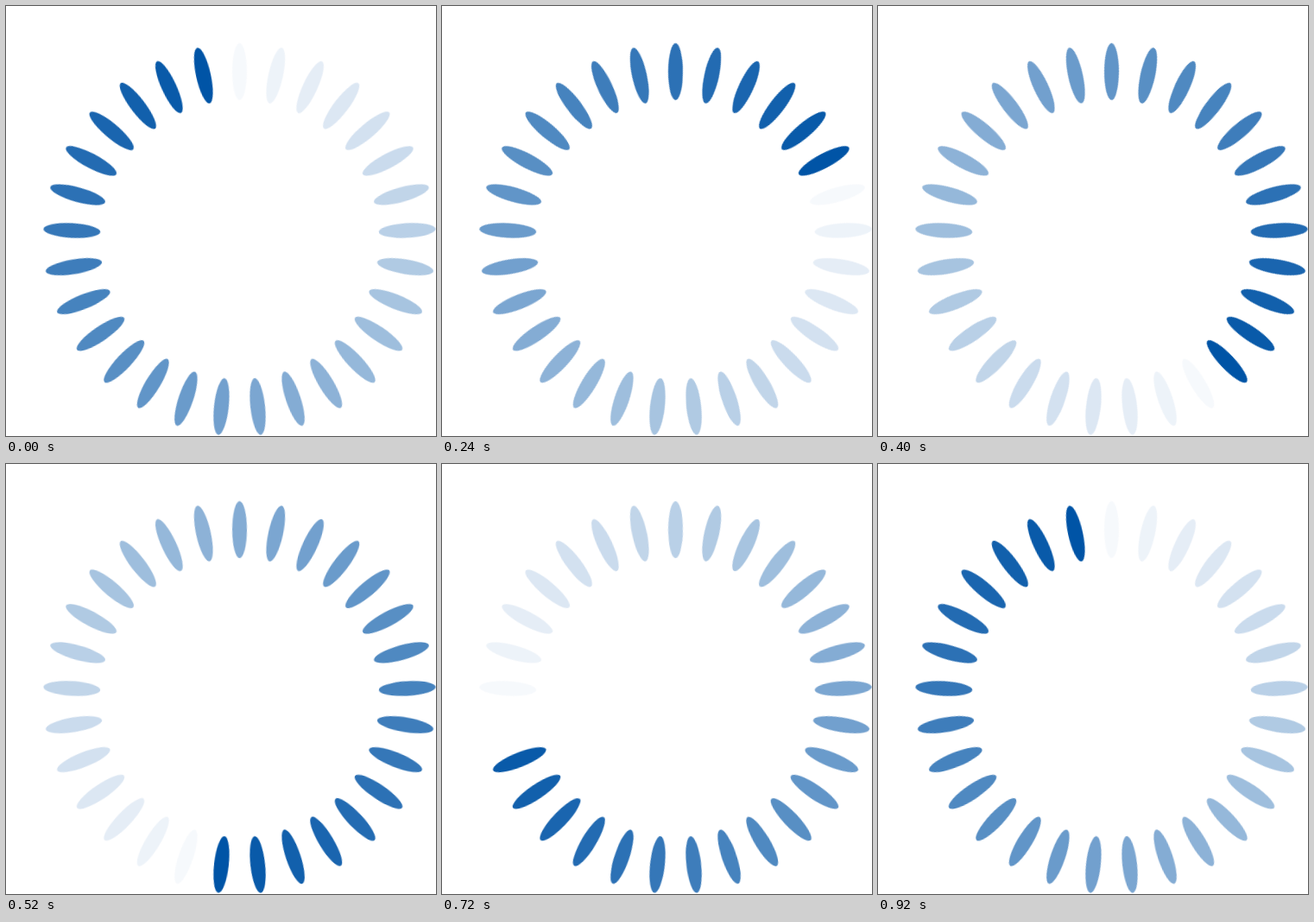
Animation, 498 px wide and 498 px high, one loop 960 ms. Source, as an HTML page without scripts:

```html
<!DOCTYPE html>
<html lang="en">
<head>
<meta charset="utf-8">
<title>Loading spinner</title>
<style>
  html, body { margin: 0; width: 100%; height: 100%; overflow: hidden; background: #fff; }
  svg { display: block; width: 498px; height: 498px; --step: calc(360deg / 29); }
  g, ellipse { transform-origin: 270.5px 270.5px; }
  ellipse {
    fill: #0054a6;
    transform: rotate(calc(var(--i) * -1 * var(--step)));
    opacity: calc(1 - var(--i) / 29);
  }

  /* One petal per tick, plus an extra petal on every third tick later on */
  .turn { animation: turn 960ms steps(24) infinite; }
  .skip { animation: skip 960ms step-end infinite; }
  .head { animation: blink 960ms step-end infinite; }

  @keyframes turn {
    from { transform: rotate(calc(-1 * var(--step))); }
    to   { transform: rotate(calc(23 * var(--step))); }
  }
  @keyframes skip {
    0%     { transform: rotate(0deg); }
    29.16% { transform: rotate(var(--step)); }
    41.66% { transform: rotate(calc(2 * var(--step))); }
    54.16% { transform: rotate(calc(3 * var(--step))); }
    66.66% { transform: rotate(calc(4 * var(--step))); }
    79.16% { transform: rotate(calc(5 * var(--step))); }
    91.66%, 100% { transform: rotate(calc(6 * var(--step))); }
  }
  @keyframes blink {
    0%, 79.16%, 100% { opacity: 1; }
    62.49% { opacity: 0; }
  }
</style>
</head>
<body>
<svg viewBox="0 0 498 498">
  <g class="turn"><g class="skip">
    <ellipse class="head" cx="270.5" cy="76" rx="8.5" ry="33" style="--i:0"/>
    <ellipse cx="270.5" cy="76" rx="8.5" ry="33" style="--i:1"/>
    <ellipse cx="270.5" cy="76" rx="8.5" ry="33" style="--i:2"/>
    <ellipse cx="270.5" cy="76" rx="8.5" ry="33" style="--i:3"/>
    <ellipse cx="270.5" cy="76" rx="8.5" ry="33" style="--i:4"/>
    <ellipse cx="270.5" cy="76" rx="8.5" ry="33" style="--i:5"/>
    <ellipse cx="270.5" cy="76" rx="8.5" ry="33" style="--i:6"/>
    <ellipse cx="270.5" cy="76" rx="8.5" ry="33" style="--i:7"/>
    <ellipse cx="270.5" cy="76" rx="8.5" ry="33" style="--i:8"/>
    <ellipse cx="270.5" cy="76" rx="8.5" ry="33" style="--i:9"/>
    <ellipse cx="270.5" cy="76" rx="8.5" ry="33" style="--i:10"/>
    <ellipse cx="270.5" cy="76" rx="8.5" ry="33" style="--i:11"/>
    <ellipse cx="270.5" cy="76" rx="8.5" ry="33" style="--i:12"/>
    <ellipse cx="270.5" cy="76" rx="8.5" ry="33" style="--i:13"/>
    <ellipse cx="270.5" cy="76" rx="8.5" ry="33" style="--i:14"/>
    <ellipse cx="270.5" cy="76" rx="8.5" ry="33" style="--i:15"/>
    <ellipse cx="270.5" cy="76" rx="8.5" ry="33" style="--i:16"/>
    <ellipse cx="270.5" cy="76" rx="8.5" ry="33" style="--i:17"/>
    <ellipse cx="270.5" cy="76" rx="8.5" ry="33" style="--i:18"/>
    <ellipse cx="270.5" cy="76" rx="8.5" ry="33" style="--i:19"/>
    <ellipse cx="270.5" cy="76" rx="8.5" ry="33" style="--i:20"/>
    <ellipse cx="270.5" cy="76" rx="8.5" ry="33" style="--i:21"/>
    <ellipse cx="270.5" cy="76" rx="8.5" ry="33" style="--i:22"/>
    <ellipse cx="270.5" cy="76" rx="8.5" ry="33" style="--i:23"/>
    <ellipse cx="270.5" cy="76" rx="8.5" ry="33" style="--i:24"/>
    <ellipse cx="270.5" cy="76" rx="8.5" ry="33" style="--i:25"/>
    <ellipse cx="270.5" cy="76" rx="8.5" ry="33" style="--i:26"/>
    <ellipse cx="270.5" cy="76" rx="8.5" ry="33" style="--i:27"/>
    <ellipse cx="270.5" cy="76" rx="8.5" ry="33" style="--i:28"/>
  </g></g>
</svg>
</body>
</html>
```
